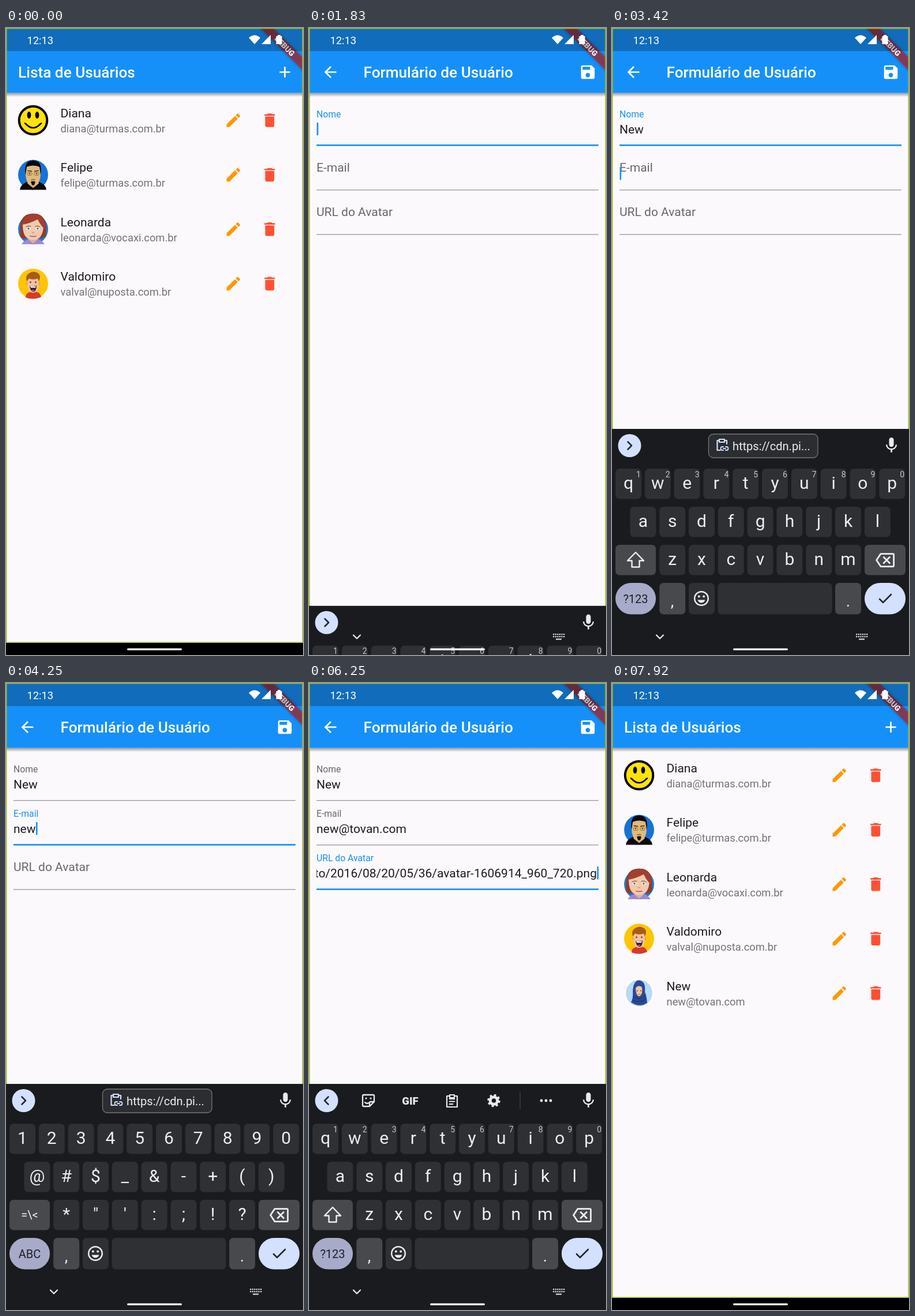
Write an HTML page that moves like this. It is 515 px wide and 1087 px high and loops after 8000 ms.

```html
<!DOCTYPE html>
<html lang="pt-BR">
<head>
<meta charset="utf-8">
<title>Lista de Usuários</title>
<style>
html, body { margin: 0; width: 100%; height: 100%; overflow: hidden; background: #000; }
svg { display: block; width: 515px; height: 1087px; font-family: Roboto, sans-serif; }
text { white-space: pre; }
.mid { text-anchor: middle; }
.line { fill: none; stroke-linecap: round; stroke-linejoin: round; }
</style>
</head>
<body>
<svg id="stage" viewBox="0 0 515 1087" xmlns="http://www.w3.org/2000/svg"></svg>
<script>
const LOOP = 8000, BLUE = '#1690f9', PAPER = '#fbf9fc', PALE = '#d3e1ff', KEY = '#2e3033', KEY2 = '#47494c';
const stage = document.getElementById('stage');

const ICONS = {
  edit: 'M3 17.25V21h3.75L17.81 9.94l-3.75-3.75L3 17.25zM20.71 7.04c.39-.39.39-1.02 0-1.41l-2.34-2.34c-.39-.39-1.02-.39-1.41 0l-1.83 1.83 3.75 3.75 1.83-1.83z',
  trash: 'M6 19c0 1.1.9 2 2 2h8c1.1 0 2-.9 2-2V7H6v12zM19 4h-3.5l-1-1h-5l-1 1H5v2h14V4z',
  add: 'M19 13h-6v6h-2v-6H5v-2h6V5h2v6h6v2z',
  back: 'M20 11H7.83l5.59-5.59L12 4l-8 8 8 8 1.41-1.41L7.83 13H20v-2z',
  save: 'M17 3H5c-1.11 0-2 .9-2 2v14c0 1.1.89 2 2 2h14c1.1 0 2-.9 2-2V7l-4-4zm-5 16c-1.66 0-3-1.34-3-3s1.34-3 3-3 3 1.34 3 3-1.34 3-3 3zm3-10H5V5h10v4z',
  mic: 'M12 14c1.66 0 3-1.34 3-3V5c0-1.66-1.34-3-3-3S9 3.34 9 5v6c0 1.66 1.34 3 3 3zm5.3-3c0 3-2.54 5.1-5.3 5.1S6.7 14 6.7 11H5c0 3.41 2.72 6.23 6 6.72V21h2v-3.28c3.28-.48 6-3.3 6-6.72h-1.7z',
  erase: 'M22 3H7c-.69 0-1.23.35-1.59.88L0 12l5.41 8.11c.36.53.9.89 1.59.89h15c1.1 0 2-.9 2-2V5c0-1.1-.9-2-2-2zm0 16H7.07L2.4 12l4.66-7H22v14zm-11.59-2L14 13.41 17.59 17 19 15.59 15.41 12 19 8.41 17.59 7 14 10.59 10.41 7 9 8.41 12.59 12 9 15.59z'
};

const icon = (name, x, y, fill, size = 31.4) =>
  `<path d="${ICONS[name]}" fill="${fill}" transform="translate(${x - size / 2} ${y - size / 2}) scale(${size / 24})"/>`;
const text = (s, x, y, size, fill, extra = '') =>
  `<text x="${x}" y="${y}" font-size="${size}" fill="${fill}" ${extra}>${s}</text>`;
const rect = (x, y, w, h, fill, r = 0, extra = '') =>
  `<rect x="${x}" y="${y}" width="${w}" height="${h}" rx="${r}" fill="${fill}" ${extra}/>`;
const circle = (x, y, r, fill, extra = '') => `<circle cx="${x}" cy="${y}" r="${r}" fill="${fill}" ${extra}/>`;
const shape = (d, fill) => `<path d="${d}" fill="${fill}"/>`;
const stroke = (d, color, w) => `<path class="line" d="${d}" stroke="${color}" stroke-width="${w}"/>`;
const both = f => f(-1) + f(1);

// Avatars are drawn around 0,0 with radius 26
const avatars = [
  circle(0, 0, 24.3, '#ffe20a', 'stroke="#000" stroke-width="4"') +
    both(s => `<ellipse cx="${s * 7}" cy="-9" rx="3.4" ry="6"/>`) +
    stroke('M-13 6Q0 20 13 6', '#000', 2.6) + both(s => stroke(`M${s * 14.5} 5l${-s * 3} 2`, '#000', 2)),
  circle(0, 0, 26, '#1573d6') +
    shape('M-23 26Q-22 16 -9 12H9Q22 16 23 26Z', '#08090d') +
    shape('M-8 8H8L10 15L0 23L-10 15Z', '#cfa567') +
    shape('M-12 -13Q0 -20 12 -13L13 -2Q13 13 5 18Q0 21 -5 18Q-13 13 -13 -2Z', '#e2ba79') +
    shape('M-13 0Q-17 -25 0 -25Q17 -25 13 0L11 -14Q0 -18 -11 -14Z', '#08090d') +
    both(s => stroke(`M${s * 2.5} -6L${s * 9} -7`, '#1b1511', 1.4) +
      rect(s * 6 - 4, -4, 8, 5, 'none', 2, 'stroke="#7b6138" stroke-width=".8"') + circle(s * 6, -1.8, 1, '#1b1511')) +
    stroke('M-3 9Q0 7.500 3 9', '#6d4a28', 1.2) + shape('M-4 12Q0 10 4 12L2 18H-2Z', '#15100c'),
  circle(0, 0, 26, '#2779c8') +
    shape('M-22 14Q-27 -28 0 -27Q27 -28 22 12L16 16H-17Z', '#8c3c2e') +
    shape('M-20 26Q-14 16 0 16Q14 16 20 26Z', '#9a86da') +
    shape('M-7 13H7L8 18L0 25L-8 18Z', '#e0b093') +
    shape('M-18 -7Q-17 -19 2 -18Q18 -18 18 -5Q17 12 8 17Q0 21 -8 17Q-18 12 -18 -7Z', '#f2c9ad') +
    shape('M-21 0Q-20 -27 3 -26Q22 -24 21 1Q13 -6 8 -17Q-8 -9 -18 -8Z', '#a2402f') +
    both(s => `<ellipse cx="${s * 8}" cy="-1" rx="3.4" ry="2.3" fill="#fff"/>` +
      circle(s * 8, -1, 1.8, '#42765c') + stroke(`M${s * 4} -5Q${s * 8} -7 ${s * 12} -4`, '#76352a', 1)) +
    stroke('M-1.500 6H1.500', '#cf9277', 1.4) + stroke('M-5 12Q0 13.500 5 12', '#bf4e51', 1.6),
  circle(0, 0, 26, '#ffc502') +
    shape('M-13 24Q-13 16 -4 14H5Q13 16 14 23Q0 29 -13 24Z', '#d63a2b') +
    both(s => circle(s * 10, 0, 2.6, '#eda17b')) +
    shape('M-9.500 -10H9.500V5Q9 15 0 16Q-9 15 -9.500 5Z', '#f8bf9c') +
    shape('M-11 -4Q-14 -14 -7 -18Q1 -24 10 -17Q14 -12 10 -4L8 -9Q0 -6 -7 -9Z', '#a45c1a') +
    both(s => circle(s * 4.5, -2.5, 1.2, '#2b2136')) +
    shape('M-6 4Q0 6 6 3Q6 14 0 14Q-5 13 -6 4Z', '#34203c') + shape('M-5 4Q0 6 5 4L4 7H-4Z', '#fff') +
    shape('M-3 12Q0 9 3 12Q0 14 -3 12Z', '#e25c5c'),
  circle(0, 0, 26, '#fff') + circle(0, 0, 23, '#b6dafa') +
    shape('M-14 16Q-10 9 -11 -3Q-10 -22 0 -22Q12 -21 10 -2Q13 5 14 17Q1 26 -14 16Z', '#2c4897') +
    shape('M-6 -9Q-1 -15 5 -10Q7 3 0 6Q-6 4 -6 -9Z', '#f3c4a0') +
    stroke('M-9 6Q1 15 11 3M-11 12Q2 18 12 10', '#1e3578', 1.3) +
    circle(-3, -4, .9, '#283058') + circle(3, -4, .9, '#283058') + stroke('M-1.500 2Q0 3 2 2', '#c85d5d', 1)
];

const users = [
  ['Diana', 'diana@turmas.com.br'],
  ['Felipe', 'felipe@turmas.com.br'],
  ['Leonarda', 'leonarda@vocaxi.com.br'],
  ['Valdomiro', 'valval@nuposta.com.br'],
  ['New', 'new@tovan.com']
];

const row = ([name, mail], i) => `<g id="row${i}" transform="translate(0 ${i * 94.4})">
  <g id="avatar${i}" transform="translate(47 160)">${avatars[i]}</g>
  ${text(name, 94.5, 155, 21, '#1d1c1e')}${text(mail, 94.5, 181, 18.35, '#747275')}
  ${icon('edit', 394.3, 160, '#ff9800')}${icon('trash', 457.3, 160, '#ff5033')}</g>`;

const page = (title, x, icons, body) => rect(0, 0, 515, 1066, PAPER) + rect(0, 112.6, 515, 7, 'url(#shade)') +
  rect(0, 0, 515, 112.6, BLUE) + text(title, x, 86, 26.2, '#fff', 'font-weight="500"') + icons + body;

const fields = [
  { label: 'Nome', value: 'New', focus: 1640, keys: [2830, 3000, 3170] },
  { label: 'E-mail', value: users[4][1], focus: 3425,
    keys: [3750, 3920, 4080, 4330, 4580, 4670, 4750, 4830, 4920, 5000, 5080, 5250, 5330] },
  { label: 'URL do Avatar', value: 'https://cdn.pixabay.com/photo/2016/08/20/05/36/avatar-1606914_960_720.png',
    focus: 5670, keys: [6250] }
];
const PITCH = 77.2, LEFT = 13, RIGHT = 502;

const fieldMarkup = (f, i) => `<g transform="translate(0 ${i * PITCH})">
  ${rect(LEFT, 203, RIGHT - LEFT, 1.2, '#918f92')}
  ${rect(LEFT, 201.9, RIGHT - LEFT, 2.6, BLUE, 0, `id="line${i}"`)}
  ${text(f.label, 0, 0, 21, '#666', `id="label${i}"`)}
  <g clip-path="url(#input)">${text('', i < 2 ? LEFT : 499, 183, 21, '#1d1c1e', `id="value${i}"` + (i < 2 ? '' : ' text-anchor="end"'))}</g></g>`;

// Keyboard
const LETTERS = ['qwertyuiop', 'asdfghjkl', 'zxcvbnm'], SYMBOLS = ['1234567890', '@#$_&-+()', '*"\':;!?'];
const rowX = [6, 31.4, 82.2], rowY = [764, 830, 896], STEP = 50.8;
const letterKeys = LETTERS.map((keys, r) => [...keys].map((k, i) => {
  const x = rowX[r] + i * STEP;
  return rect(x, rowY[r], 45, 52.5, KEY, 7) +
    text(k, x + 22.5, rowY[r] + 35, 30, '#eceef0', 'class="mid key"') +
    (r ? '' : text((i + 1) % 10, x + 40, 778.5, 14, '#c5c7ca', 'class="mid hint"'));
}).join('')).join('');

const clip = (x, y) => stroke(`M${x - 4} ${y - 9}h-5v19h18v-19h-5M${x - 4} ${y - 11}h8v5h-8Z`, '#e8eaed', 2.2);
const suggestion = rect(167.5, 704, 189.5, 41, '#2b2d30', 8, 'stroke="#74777b" stroke-width="1.3"') +
  stroke('M186 715h-3.500v17h5M195 715h4v6M186 713h9v5h-9Z', PALE, 2.2) +
  stroke('M193 726h-1.500a3 3 0 0 0 0 6h1.500M197 726h1.500a3 3 0 0 1 0 6h-1.500M193 729h4', PALE, 1.8) +
  text('https://cdn.pi...', 209, 732, 20, '#eceef0');
const tools =
  stroke('M95 714h16q2 0 2 2v10l-8 8h-10q-2 0-2-2v-16q0-2 2-2ZM113 726h-6q-2 0-2 2v6M97 727q3 3 6 1', '#e8eaed', 2.3) +
  circle(99, 720, 1.6, '#e8eaed') + circle(107, 720, 1.6, '#e8eaed') +
  text('GIF', 175.5, 730.5, 18.5, '#e8eaed', 'class="mid" font-weight="900"') +
  clip(248, 725) + stroke('M243.500 721h9M243.500 725.500h9M243.500 730h6', '#e8eaed', 1.8) +
  circle(320.5, 724, 6.3, 'none', 'stroke="#e8eaed" stroke-width="5"') +
  circle(320.5, 724, 9.5, 'none', 'stroke="#e8eaed" stroke-width="3.4" stroke-dasharray="3.73"') +
  rect(365.5, 709, 1.2, 30, '#44464a') + [403, 411, 419].map(x => circle(x, 724, 2.4, '#e8eaed')).join('');

const keyboard = rect(0, 695, 515, 400, '#191b1e') + circle(30.5, 724, 20, PALE) +
  `<g id="chevron">${stroke('M27.500 717.500l6.500 6.500-6.500 6.500', '#202833', 2.6)}</g>` +
  `<g id="suggestion">${suggestion}</g><g id="tools">${tools}</g>` +
  icon('mic', 484.5, 723.5, '#e8eaed', 32.5) + letterKeys +
  rect(6, 896, 70, 52.5, KEY2, 7) + `<g id="shift">${stroke('M41 909L27 923.500h7.500v11h13v-11h7.500Z', '#eceef0', 2.4)}</g>` +
  text('=\\&lt;', 41, 929, 20, '#eceef0', 'class="mid" id="more"') +
  rect(438, 896, 71, 52.5, KEY2, 7) + icon('erase', 473.5, 922.5, '#eceef0', 33) +
  rect(6, 962, 70, 54.5, '#a8aac9', 27) + text('?123', 41, 997, 20, '#1d1f2b', 'class="mid" id="mode"') +
  rect(82.2, 962, 45, 54.5, KEY2, 7) + text(',', 104.5, 1003, 28, '#eceef0', 'class="mid"') +
  rect(133, 962, 45, 54.5, KEY, 7) + circle(155, 989, 11.8, 'none', 'stroke="#eceef0" stroke-width="2.4"') +
  circle(150.8, 985.5, 1.9, '#eceef0') + circle(159.2, 985.5, 1.9, '#eceef0') + shape('M148.500 991.500h13q-2 5-6.500 5t-6.500-5Z', '#eceef0') +
  rect(183.5, 962, 198, 54.5, KEY, 7) +
  rect(387, 962, 45, 54.5, KEY2, 7) + text('.', 409.5, 1003, 28, '#eceef0', 'class="mid"') +
  rect(438, 962, 71, 54.5, PALE, 27) + stroke('M464 990l6 6 14-14', '#22252c', 2.6);

const dots = (x, y, n) => Array.from({ length: n }, (_, i) => rect(x + i * 3.6, y, 2.3, 2.3, '#d5d7da')).join('');
const navIcons = stroke('M77 1052.500l6 6 6-6', '#eceef0', 2.2) + dots(423, 1050, 6) + dots(423, 1054, 6) + rect(428, 1058.5, 10, 2.2, '#d5d7da');

const banner = `<g transform="translate(514.500 0) rotate(45)">
  ${rect(-80, 36.2, 160, 15.8, '#b71c1c', 0, 'fill-opacity=".63" filter="url(#soft)"')}
  ${text('DEBUG', 0, 48.9, 13.4, '#fff', 'class="mid" font-weight="900"')}</g>`;
const status = text('12:13', 36.5, 28, 18.35, '#fff') +
  shape('M421 17Q431 8 441 17L431 28Z', '#fff') + shape('M459 12V28H443Z', '#fff') +
  shape('M471 14V12H476V14H478.500V28H468.500V14Z', '#fff');
const hand = `<path d="M475 130L469.800 103Q468.500 97.500 472.500 96.500Q476 96.500 477.500 101L481 114Q482 109.500 485.500 110Q488.500 110.500 489 114Q490 110.500 493.500 111.500Q496 112.500 496.500 116Q498.500 114 500 117Q502.500 126 499.500 137V147Q490 150 478.500 148.500Q473 143 468.500 137L456 130Q452.500 126 455 123.500Q459 121.500 465 126L474 132Z" fill="#fff" stroke="#000" stroke-width="3.2" stroke-linejoin="round"/>` +
  stroke('M481 114l1.200 7M489 114l.8 6M496.500 116l.4 4', '#000', 2.4);

stage.innerHTML = `<defs>
  <linearGradient id="shade" x1="0" y1="0" x2="0" y2="1"><stop stop-color="#000" stop-opacity=".38"/><stop offset="1" stop-color="#000" stop-opacity="0"/></linearGradient>
  <clipPath id="input"><path d="M13 150H502V200H13Z"/></clipPath>
  <filter id="soft" x="-10%" y="-60%" width="120%" height="220%"><feDropShadow dx="0" dy="0" stdDeviation="2.6" flood-opacity=".5"/></filter></defs>
  <g>${page('Lista de Usuários', 21, icon('add', 483.5, 76.5, '#fff'), users.map(row).join(''))}</g>
  <g id="form">${page('Formulário de Usuário', 94.5, icon('back', 37, 76.5, '#fff') + icon('save', 483.5, 76.5, '#fff'),
    fields.map(fieldMarkup).join('') + rect(0, 164, 2.6, 22, BLUE, 0, 'id="caret"'))}</g>
  ${banner}${rect(0, 0, 515, 40, '#000', 0, 'fill-opacity=".25"')}${status}
  ${rect(0.7, 0.7, 513.6, 1064.4, 'none', 0, 'stroke="#a5bf22" stroke-width="1.5"')}
  ${rect(0, 1066, 515, 21, '#000')}
  <g id="keyboard">${keyboard}</g><g id="nav">${navIcons}</g>
  ${rect(210, 1075.5, 95, 3.2, '#fff', 1.6)}
  <g id="hand">${hand}</g>`;

const el = {};
stage.querySelectorAll('[id]').forEach(n => el[n.id] = n);
const keyNodes = [...stage.querySelectorAll('.key')], hints = [...stage.querySelectorAll('.hint')];

const ramp = (t, at, span) => Math.min(1, Math.max(0, (t - at) / span));
const ease = x => x * x * (3 - 2 * x);
const between = (t, a, b) => t >= a && t < b;
const show = (node, on) => { node.style.opacity = +on; };

let layout = '';
function setLayout(name) {
  if (name === layout) return;
  layout = name;
  const symbols = name === 'symbols', chars = (symbols ? SYMBOLS : LETTERS).join('');
  keyNodes.forEach((n, i) => n.textContent = name === 'upper' ? chars[i].toUpperCase() : chars[i]);
  hints.forEach(n => show(n, !symbols));
  show(el.shift, !symbols);
  show(el.more, symbols);
  el.mode.textContent = symbols ? 'ABC' : '?123';
}

function drawFields(t) {
  let active = 0, last = fields[0].focus;
  fields.forEach((f, i) => {
    const next = fields[i + 1];
    const up = ease(ramp(t, f.focus, 200));
    const lit = up - (next ? ease(ramp(t, next.focus, 200)) : 0);
    el['line' + i].style.opacity = lit;
    const label = el['label' + i];
    label.setAttribute('transform', `translate(${LEFT} ${172 - 17 * up}) scale(${1 - up / 4})`);
    label.setAttribute('fill', lit > .4 ? BLUE : '#69676a');
    const typed = f.keys.filter(k => k <= t).length;
    el['value' + i].textContent = typed === f.keys.length ? f.value : f.value.slice(0, f.keys.length > 1 ? typed : 0);
    if (t >= f.focus - 10) {
      active = i;
      last = typed ? f.keys[typed - 1] : f.focus;
    }
  });
  const value = el['value' + active];
  const width = value.textContent ? value.getComputedTextLength() : 0;
  el.caret.setAttribute('transform', `translate(${Math.min(LEFT + width + .5, 499.5)} ${active * PITCH})`);
  show(el.caret, t >= fields[0].focus && (t - last + 1000) % 1000 < 510 || t < last);
}

function draw(t) {
  const open = ease(ramp(t, 1340, 300)) - ease(ramp(t, 7330, 300));
  el.form.style.opacity = open;
  el.form.setAttribute('transform', `translate(0 ${(1 - open) * 266})`);
  drawFields(t);

  const raised = ease(ramp(t, 1748, 300)) - ease(ramp(t, 7330, 280));
  const pasted = t >= fields[2].keys[0];
  el.keyboard.setAttribute('transform', `translate(0 ${(1 - raised) * 392})`);
  show(el.keyboard, raised > 0);
  show(el.nav, raised > 0);
  show(el.suggestion, t >= 2160 && !pasted);
  show(el.tools, pasted);
  el.chevron.setAttribute('transform', pasted ? 'translate(61 0) scale(-1 1)' : '');
  setLayout(between(t, 2580, 2830) ? 'upper' : between(t, 4250, 4420) ? 'symbols' : 'lower');

  show(el.row4, t >= 7330);
  show(el.avatar4, t >= 7660);
  el.hand.style.opacity = ramp(t, 600, 150) - ramp(t, 1300, 120) + ramp(t, 6750, 150) - ramp(t, 7250, 120);
}

// Twelve pictures a second
const start = performance.now();
function tick() {
  const t = (performance.now() - start) % LOOP;
  draw(Math.floor((t + 8) * .012) / .012 % LOOP + 5);
  requestAnimationFrame(tick);
}
tick();
</script>
</body>
</html>
```
